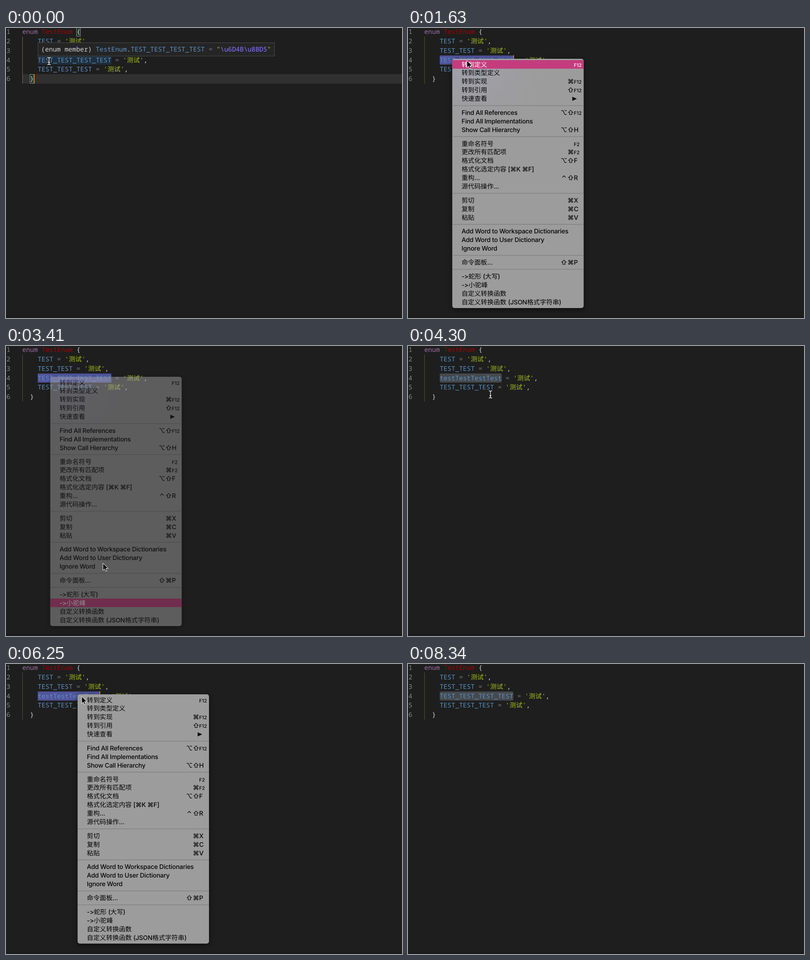
Recreate the animation shown at these times as an HTML page. Size 874 by 641 pixels, loop 8790 ms.

```html
<!DOCTYPE html>
<html lang="zh-CN">
<head>
<meta charset="utf-8">
<title>Enum case conversion</title>
<style>
  html, body { margin: 0; width: 100%; height: 100%; overflow: hidden; background: #1e1e1e; }
  svg { display: block; width: 874px; height: 641px; }
  text { white-space: pre; text-rendering: geometricPrecision; }
  .code { font: 14.25px "Noto Sans Mono", "Noto Sans CJK SC", "Noto Sans CJK", monospace; fill: #d4d4d4; }
  #tip .code { font-size: 14.33px; }
  .num { fill: #858585; }
  .key { fill: #a06ea6; }
  .type { fill: #a00404; }
  .name { fill: #5a90c2; }
  .op { fill: #737373; }
  .str { fill: #a3bf20; }
  .esc { fill: #8878ff; }
  .row { font: 500 13.9px Inter, "DejaVu Sans", "Noto Sans CJK SC", sans-serif; letter-spacing: -.25px; fill: #050505; }
  .row.on { fill: #fff; }
  .han { font: 500 14.15px "Noto Sans CJK SC", "Noto Sans CJK", sans-serif; letter-spacing: 0; }
  .mod { letter-spacing: 0; text-anchor: middle; }
  .fn { font-size: 10.6px; letter-spacing: 0; }
</style>
</head>
<body>
<svg id="stage" viewBox="0 0 874 641" xmlns="http://www.w3.org/2000/svg"></svg>
<script>
const LOOP = 8790, TICK = 149;
const CHAR = 8.55, LINE = 20.8, TOP = -2, LEFT = 36, INDENT = 70;
const TIP_CHAR = 8.6, ROW = 18.9, GAP = 11.9;
const UPPER = 'TEST_TEST_TEST_TEST', CAMEL = 'testTestTestTest';

const stage = document.getElementById('stage');
const $ = id => document.getElementById(id);
const lineTop = n => TOP + (n - 1) * LINE;
const span = (cls, s, id = '') => `<tspan class="${cls}"${id && ` id="${id}"`}>${s}</tspan>`;
const code = (x, y, body) => `<text class="code" x="${x}" y="${y}">${body}</text>`;
const rect = (x, y, w, h, rest) => `<rect x="${x}" y="${y}" width="${w}" height="${h}" ${rest}/>`;

// Editor
const member = (s, id) => span('name', s, id) + span('op', ' = ') + span('str', "'测试'") + ',';
const lines = [
  [LEFT, span('key', 'enum ') + span('type', 'TestEnum') + ' {'],
  [INDENT, member('TEST')],
  [INDENT, member('TEST_TEST')],
  [INDENT, member(UPPER, 'word')],
  [INDENT, member('TEST_TEST_TEST')],
  [LEFT + 2 * CHAR, '}']
];
const editor = lines.map(([x, body], i) => {
  const y = lineTop(i + 1) + 15.2;
  return code(1, y, span('num', i + 1)) + code(x, y, body);
}).join('');

const braceBox = (x, n) => rect(x, lineTop(n) + .5, CHAR, LINE - 1, 'fill="#1d3524" stroke="#8a8a8a"');

const tip = rect(70.5, 32.5, 0, 29.5, 'id="tipBox" fill="#252526" stroke="#4a4a4a"') +
  code(77.6, 52, '(enum member) ' + span('name', 'TestEnum') + '.' + span('name', '', 'tipWord') +
    span('op', ' = ') + span('str', '"') + span('esc', '\\u6D4B\\u8BD5') + span('str', '"'));

// Context menu: label, modifiers, key
const groups = [
  [['转到定义', '', 'F12'], ['转到类型定义'], ['转到实现', '⌘', 'F12'], ['转到引用', '⇧', 'F12'], ['快速查看', '', '▶']],
  [['Find All References', '⌥⇧', 'F12'], ['Find All Implementations'], ['Show Call Hierarchy', '⌥⇧', 'H']],
  [['重命名符号', '', 'F2'], ['更改所有匹配项', '⌘', 'F2'], ['格式化文档', '⌥⇧', 'F'],
    ['格式化选定内容 [⌘K ⌘F]'], ['重构...', '⌃⇧', 'R'], ['源代码操作...']],
  [['剪切', '⌘', 'X'], ['复制', '⌘', 'C'], ['粘贴', '⌘', 'V']],
  [['Add Word to Workspace Dictionaries'], ['Add Word to User Dictionary'], ['Ignore Word']],
  [['命令面板...', '⇧⌘', 'P']],
  [['-&gt;蛇形 (大写)'], ['-&gt;小驼峰'], ['自定义转换函数'], ['自定义转换函数 (JSON格式字符串)']]
];
const rowY = [];

function menuRow([label, mods = '', key = ''], y) {
  const base = y + 5;
  let out = `<text x="20.5" y="${base}">${label.replace(/[\u4e00-\u9fff]+/g, s => span('han', s))}</text>`;
  [...mods].reverse().forEach((m, i) => {
    out += `<text class="mod" x="${261.5 - i * 15}" y="${base}">${m}</text>`;
  });
  if (key === '▶') out += `<path d="M265 ${y - 4}l10 4.5l-10 4.5z"/>`;
  else if (key) out += `<text class="${key.length > 1 ? 'fn' : ''}" x="268.3" y="${base}">${key}</text>`;
  return `<g class="row">${out}</g>`;
}

function menuBody() {
  let y = 12.5, rows = '', rules = '';
  groups.forEach((group, g) => {
    if (g) {
      rules += rect(0, y - ROW / 2 + GAP / 2 - .8, 290, 1.6, 'fill="#848484"');
      y += GAP;
    }
    for (const item of group) {
      rowY.push(y);
      rows += menuRow(item, y);
      y += ROW;
    }
  });
  return rules + rect(0, 0, 290, ROW, 'id="bar" fill="#c43c7d"') + rows;
}

stage.innerHTML = `
  <defs>
    <filter id="blur" x="-20%" y="-20%" width="140%" height="140%"><feGaussianBlur stdDeviation="6"/></filter>
    <radialGradient id="glow" gradientUnits="userSpaceOnUse" cx="40" cy="0" r="190">
      <stop offset="0" stop-color="#aaa8d0" stop-opacity=".4"/>
      <stop offset="1" stop-color="#9e9e9e" stop-opacity="0"/>
    </radialGradient>
  </defs>
  ${rect(0, 0, 874, 641, 'fill="#1e1e1e"')}
  ${rect(0, 636, 874, 5, 'fill="#1b1b1b"')}
  ${rect(LEFT + 1, 0, 874 - LEFT, LINE, 'id="current" fill="#303030"')}
  <g id="braces">${braceBox(LEFT + 14 * CHAR, 1)}${braceBox(LEFT + 2 * CHAR, 6)}</g>
  ${rect(INDENT, lineTop(4) + .4, 0, 20, 'id="mark"')}
  ${rect(LEFT, lineTop(2), 1, LINE * 5, 'id="guide"')}
  ${editor}
  ${rect(0, 0, 2, LINE, 'id="caret" fill="#d6862a"')}
  <g id="tip">${tip}</g>
  <g id="menu">
    ${rect(0, 3, 290, 551, 'rx="5" fill="#000" opacity=".55" filter="url(#blur)"')}
    ${rect(0, 0, 290, 551, 'rx="5" fill="#9c9c9c"')}
    ${rect(0, 0, 290, 551, 'id="tint" rx="5" fill="url(#glow)"')}
    ${menuBody()}
  </g>
  <path id="arrow" d="M0 0V16L3.7 12.6L6 18L8.7 16.9L6.4 11.6H11.4Z" fill="#000" stroke="#fff" stroke-width="1"/>
  <g id="beam" fill="none">
    <path d="M-3.5 -8Q0 -8 0 -6Q0 -8 3.5 -8M0 -6V6M-3.5 8Q0 8 0 6Q0 8 3.5 8M-2 3H2" stroke="#111" stroke-width="3"/>
    <path d="M-3.5 -8Q0 -8 0 -6Q0 -8 3.5 -8M0 -6V6M-3.5 8Q0 8 0 6Q0 8 3.5 8M-2 3H2" stroke="#fff" stroke-width="1.3"/>
  </g>`;
const rowNodes = [...stage.querySelectorAll('.row')];

// Pointer keys: tick, x, y
const path = [
  [0, 95, 73], [9, 95, 73], [10, 101, 73], [11, 130, 71.8], [12, 146, 96], [15, 190, 330], [18, 219, 548],
  [19, 223, 566], [22, 223, 566], [23, 214, 480], [24, 176, 300], [25, 140, 130], [26, 146, 125], [29, 182, 107],
  [30, 182, 107], [32, 116, 113], [33, 116, 113], [35, 156, 73], [41, 157, 73], [42, 167, 71.5],
  [43, 171, 84], [46, 200, 290], [50, 227.5, 548], [54, 227.5, 548], [55, 615, 600], [59, 615, 600]
];

function pointerAt(t) {
  const tick = Math.floor((t + 22) / TICK);
  let i = 1;
  while (i < path.length - 1 && path[i][0] < tick) i++;
  const [a, ax, ay] = path[i - 1], [b, bx, by] = path[i];
  const k = Math.min(1, (tick - a) / (b - a));
  return [ax + (bx - ax) * k, ay + (by - ay) * k];
}

const within = (t, a, b) => t >= a && t < b;
const show = (id, on) => $(id).setAttribute('visibility', on ? 'visible' : 'hidden');
const set = (id, attrs) => { for (const k in attrs) $(id).setAttribute(k, attrs[k]); };

// Blink origin, line and column x of the caret
function caretAt(t, end) {
  if (t < 590) return [-200, 6, LEFT + 3 * CHAR];
  if (t < 1040) return [590, 4, INDENT + 3 * CHAR];
  if (t < 1480) return [1040, 4, end];
  if (t < 3560) return [1480, 4, end];
  if (t < 4900) return [3600, 4, end];
  if (t < 5650) return [4900, 6, LEFT + 3 * CHAR];
  if (t < 5950) return [5650, 4, INDENT + 10 * CHAR];
  if (t < 6250) return [5950, 4, end];
  if (t < 8040) return [6250, 4, end];
  return [7840, 4, end];
}

function draw(t) {
  const word = within(t, 3560, 8040) ? CAMEL : UPPER;
  const width = word.length * CHAR;
  $('word').textContent = $('tipWord').textContent = word;

  // Current line, matching braces and hover tip
  const lastLine = t < 590 || within(t, 4900, 5650);
  const clicked = within(t, 590, 1040) || within(t, 5650, 5950);
  const matched = t < 890 || within(t, 4900, 5950);
  const hover = t < 590 || within(t, 5350, 5650);
  show('current', lastLine || clicked);
  set('current', { y: lineTop(lastLine ? 6 : 4) });
  show('braces', matched);
  set('guide', { fill: matched ? '#74703f' : '#56532f' });
  show('tip', hover);
  set('tipBox', { width: (40 + word.length) * TIP_CHAR + 14.6 });

  // Word background: hover, active selection or settled selection
  const active = within(t, 1040, 3560) || within(t, 5950, 8040);
  const settled = within(t, 3560, 4900) || t >= 8040;
  show('mark', hover || active || settled);
  set('mark', {
    width,
    fill: active ? '#51549b' : settled ? '#46494d' : '#1f2f3d',
    rx: settled ? 3 : 0
  });

  const [origin, line, x] = caretAt(t, INDENT + width);
  show('caret', Math.floor((t - origin) / 500) % 2 === 0);
  set('caret', { x: Math.floor(x), y: lineTop(line) });

  // Context menu; the chosen row blinks once before the menu fades
  const first = within(t, 1480, 3560), open = first || within(t, 6250, 8040);
  const [mx, my] = first ? [97.7, 68] : [158, 67];
  const [px, py] = pointerAt(t);
  show('menu', open);
  set('menu', {
    transform: `translate(${mx} ${my})`,
    opacity: within(t, 3410, 3560) || within(t, 7890, 8040) ? .5 : 1
  });
  set('tint', { opacity: first ? 1 : 0 });
  const quiet = t < 1630 || within(t, 3110, 3260) || within(t, 6250, 6390) || within(t, 7740, 7890);
  let chosen = open && !quiet ? rowY.findIndex(y => Math.abs(py - my - y) <= ROW / 2) : -1;
  if (within(t, 3260, 3560)) chosen = rowY.length - 3;
  rowNodes.forEach((n, i) => n.classList.toggle('on', i === chosen));
  $('bar').setAttribute('display', chosen < 0 ? 'none' : 'inline');
  if (chosen >= 0) set('bar', { y: rowY[chosen] - ROW / 2 });

  show('arrow', open);
  show('beam', !open && t < 8340);
  for (const id of ['arrow', 'beam']) set(id, { transform: `translate(${px} ${py})` });
}

const start = performance.now();
function frame() {
  draw((performance.now() - start) % LOOP);
  requestAnimationFrame(frame);
}
frame();
</script>
</body>
</html>
```
